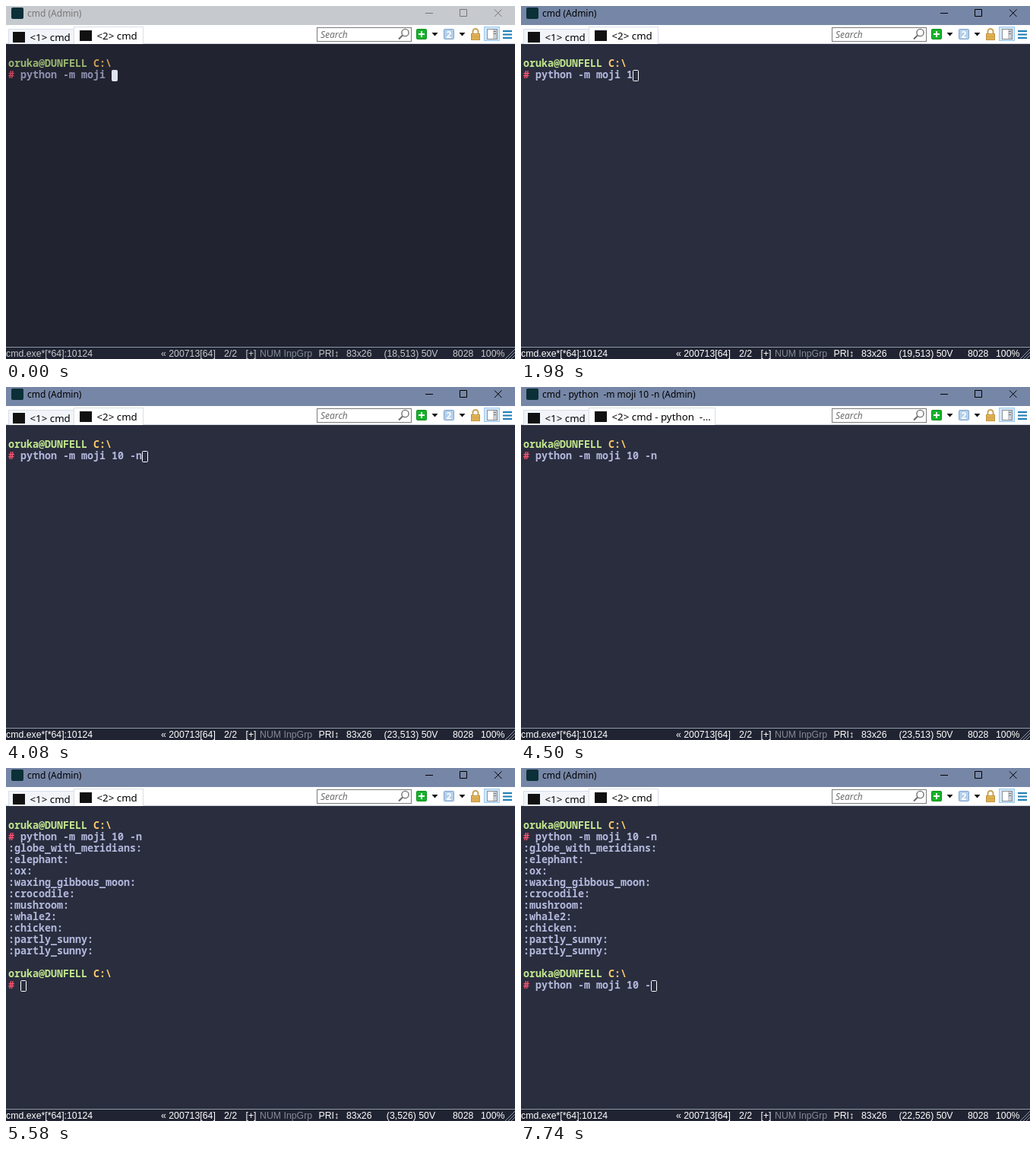
An HTML page that plays this animation: 670x464 px, repeating every 8 s.

```html
<!DOCTYPE html>
<html lang="en">
<head>
<meta charset="utf-8">
<title>Console</title>
<style>
  html, body { margin: 0; width: 100%; height: 100%; overflow: hidden; }
  svg {
    display: block; width: 670px; height: 464px;
    --bar: #7686a6; --ink: #000; --back: #292d3e; --text: #b4b8dc;
    --user: #c3e88d; --path: #ffcb6b; --hash: #ff5370; --foot: #fff;
  }
  svg.dim {
    --bar: #c6c9ce; --ink: #777; --back: #212330; --text: #8f92b0;
    --user: #9bb972; --path: #cda256; --hash: #cf4560; --foot: #c8c9cc;
  }
  text { white-space: pre; }
  .ui { font: 12px "Noto Sans", "Open Sans", sans-serif; }
  .tab { font-size: 13.3px; }
  .hint { font-style: italic; fill: #6d6d6d; }
  .badge { font-weight: 700; fill: #fff; text-anchor: middle; }
  .term { font: 600 13.333px "Noto Sans Mono", monospace; fill: var(--text); }
  .user { fill: var(--user); }
  .path { fill: var(--path); }
  .hash { fill: var(--hash); font-weight: 700; }
  .foot { font: 12.3px "Liberation Sans", Arial, sans-serif; fill: var(--foot); }
  .off { fill: #858a96; }
  .control { fill: none; stroke: var(--ink); }
  #caret { fill: none; stroke: #fff; }
  .dim #caret { fill: #e0e4ee; stroke: #e0e4ee; }
</style>
</head>
<body>
<svg id="stage" viewBox="0 0 670 464">
  <!-- title bar -->
  <rect width="670" height="25" fill="var(--bar)"/>
  <rect x="7" y="2" width="16" height="15" rx="2" fill="#0b3038"/>
  <text id="title" class="ui" x="28" y="14" fill="var(--ink)"></text>
  <g class="control">
    <path d="M552 9.5H562M597.5 4.5H606.5V13.5H597.5Z"/>
    <path d="M643 4.5L652.5 14M652.5 4.5L643 14"/>
  </g>

  <!-- tabs -->
  <rect y="25" width="670" height="25" fill="#fff"/>
  <path d="M0 49.5H670" stroke="#d0d5dd"/>
  <rect x="3.5" y="30.5" width="86" height="20" fill="#f1f4f9" stroke="#d9dfe8"/>
  <rect id="tabBox" x="89.5" y="27.5" width="91" height="23" fill="#fff" stroke="#d9dfe8"/>
  <rect x="9" y="34" width="16" height="14" fill="#111"/>
  <rect x="97" y="32" width="16" height="14" fill="#111"/>
  <text class="ui tab" x="31.5" y="46">&lt;1&gt; cmd</text>
  <text id="tab" class="ui tab" x="119.5" y="44"></text>

  <!-- toolbar -->
  <rect x="409.5" y="28.5" width="124" height="18" fill="#fff" stroke="#7a7a7a"/>
  <text class="ui hint" x="414" y="42">Search</text>
  <g fill="none" stroke="#707070">
    <circle cx="525.5" cy="35" r="4.6" stroke-width="1.4"/>
    <path d="M522 38.5L517 43.5" stroke-width="2.2"/>
  </g>
  <rect x="540.5" y="30.5" width="13" height="13" rx="1" fill="#16b22b" stroke="#0b8f1d"/>
  <path d="M547 33V41M543 37H551" stroke="#fff" stroke-width="2"/>
  <path d="M560.5 35H568.5L564.5 39.5ZM596.5 35H604.5L600.5 39.5Z" fill="#111"/>
  <rect x="576.5" y="30.5" width="13" height="13" rx="1" fill="#b4cfea" stroke="#7fa3cc"/>
  <text class="ui badge" x="583" y="41.5">2</text>
  <path d="M614.5 37V33.5A3.5 3.5 0 0 1 621.5 33.5V37" fill="none" stroke="#c9a25a" stroke-width="2"/>
  <rect x="612.5" y="36.5" width="11" height="8" fill="#e6b95c" stroke="#c0913a"/>
  <path d="M613 39.5H623M613 42H623" stroke="#c9983f"/>
  <rect x="629.5" y="27.5" width="20" height="18" fill="#d3e8f9" stroke="#99c9ef"/>
  <rect x="633.5" y="30.5" width="13" height="13" fill="#fff" stroke="#8a8f96"/>
  <path d="M643.5 31V43" stroke="#c9ccd1" stroke-width="5"/>
  <path d="M642 33.5H645M642 36.5H645" stroke="#777"/>
  <path d="M654 33H666M654 37.5H666M654 42H666" stroke="#1a7db6" stroke-width="2"/>

  <!-- console -->
  <rect y="50" width="670" height="398" fill="var(--back)"/>
  <g id="term" class="term"></g>
  <rect id="caret" y="84.5" width="7" height="14" rx="1"/>

  <!-- status bar -->
  <rect y="448" width="670" height="16" fill="#202331"/>
  <path d="M0 448.5H670" stroke="#8d9aa8"/>
  <g class="foot">
    <text x="0" y="461">cmd.exe*[*64]:10124</text>
    <text x="204" y="461">« 200713[64]</text>
    <text x="287" y="461">2/2</text>
    <text x="315.5" y="461">[+]</text>
    <text class="off" x="334" y="461">NUM</text>
    <text class="off" x="365.5" y="461">InpGrp</text>
    <text x="411.5" y="461">PRI↕</text>
    <text x="448" y="461">83x26</text>
    <text id="place" x="533" y="461" text-anchor="middle"></text>
    <text x="588" y="461">8028</text>
    <text x="625" y="461">100%</text>
  </g>
  <path d="M657 464L670 451M661 464L670 455M665 464L670 459" stroke="#8d9aa8"/>
</svg>
<script>
  const LOOP = 8000, CELL = 8, ROW = 15, LEFT = 3;
  const byId = id => document.getElementById(id);
  const [stage, term, caret, title, tab, tabBox, place] =
    ['stage', 'term', 'caret', 'title', 'tab', 'tabBox', 'place'].map(byId);

  function add(parent, name, attrs, text = '') {
    const el = document.createElementNS('http://www.w3.org/2000/svg', name);
    for (const key in attrs) el.setAttribute(key, attrs[key]);
    el.textContent = text;
    return parent.appendChild(el);
  }

  const write = (parent, col, row, text, cls = '') =>
    add(parent, 'text', { x: LEFT + col * CELL, y: 65 + row * ROW, class: cls }, text);

  // Returns the text element that holds the typed command.
  function prompt(parent, row) {
    write(parent, 0, row, 'oruka@DUNFELL', 'user');
    write(parent, 14, row, 'C:\\', 'path');
    write(parent, 0, row + 1, '#', 'hash');
    return write(parent, 2, row + 1, '');
  }

  const first = prompt(term, 1);
  const output = add(term, 'g', {});
  ['globe_with_meridians', 'elephant', 'ox', 'waxing_gibbous_moon', 'crocodile',
   'mushroom', 'whale2', 'chicken', 'partly_sunny', 'partly_sunny']
    .forEach((name, i) => write(output, 0, 3 + i, `:${name}:`));
  const second = prompt(output, 14);

  const base = 'python -m moji ', full = base + '10 -n';
  const plain = { title: 'cmd (Admin)', tab: '<2> cmd' };

  // Each step changes only the listed parts of the state.
  const steps = [
    [0, { ...plain, dim: true, done: false, cmd: base, on: true, at: '18,513' }],
    [1260, { dim: false }],
    [1740, { on: false }],
    [1980, { cmd: base + '1', on: true, at: '19,513' }],
    [2460, { cmd: base + '10', at: '20,513' }],
    [3000, { on: false }],
    [3060, { cmd: base + '10 ', on: true, at: '21,513' }],
    [3420, { cmd: base + '10 -' }],
    [3600, { at: '22,513' }],
    [3900, { on: false }],
    [4020, { cmd: full, on: true }],
    [4080, { at: '23,513' }],
    [4500, { on: false, title: `cmd - python  ${full.slice(7)} (Admin)`, tab: '<2> cmd - python  -...' }],
    [4560, { done: true, cmd: '', on: true, at: '1,514', title: plain.title }],
    [4620, plain],
    [4980, { at: '3,526' }],
    [5100, { on: false }],
    [5580, { on: true }],
    [6060, { on: false }],
    [6600, { on: true }],
    [7080, { on: false }],
    [7140, { cmd: full, on: true, at: '23,526' }],
    [7680, { on: false }],
    [7740, { cmd: full.slice(0, -1), on: true, at: '22,526' }]
  ];

  let shown = -1;
  function draw(t) {
    const last = steps.filter(step => step[0] <= t).length;
    if (last === shown) return;
    shown = last;
    const s = Object.assign({}, ...steps.slice(0, last).map(step => step[1]));
    stage.classList.toggle('dim', s.dim);
    title.textContent = s.title;
    tab.textContent = s.tab;
    tabBox.setAttribute('width', s.tab === plain.tab ? 91 : 166);
    place.textContent = `(${s.at}) 50V`;
    first.textContent = s.done ? full : s.cmd;
    second.textContent = s.cmd;
    output.style.display = s.done ? '' : 'none';
    caret.style.display = s.on ? '' : 'none';
    caret.setAttribute('x', LEFT + (2 + s.cmd.length) * CELL + 0.5);
    caret.setAttribute('y', 54.5 + (s.done ? 15 : 2) * ROW);
  }

  const start = performance.now();
  function tick() {
    draw((performance.now() - start) % LOOP);
    requestAnimationFrame(tick);
  }
  tick();
</script>
</body>
</html>
```
